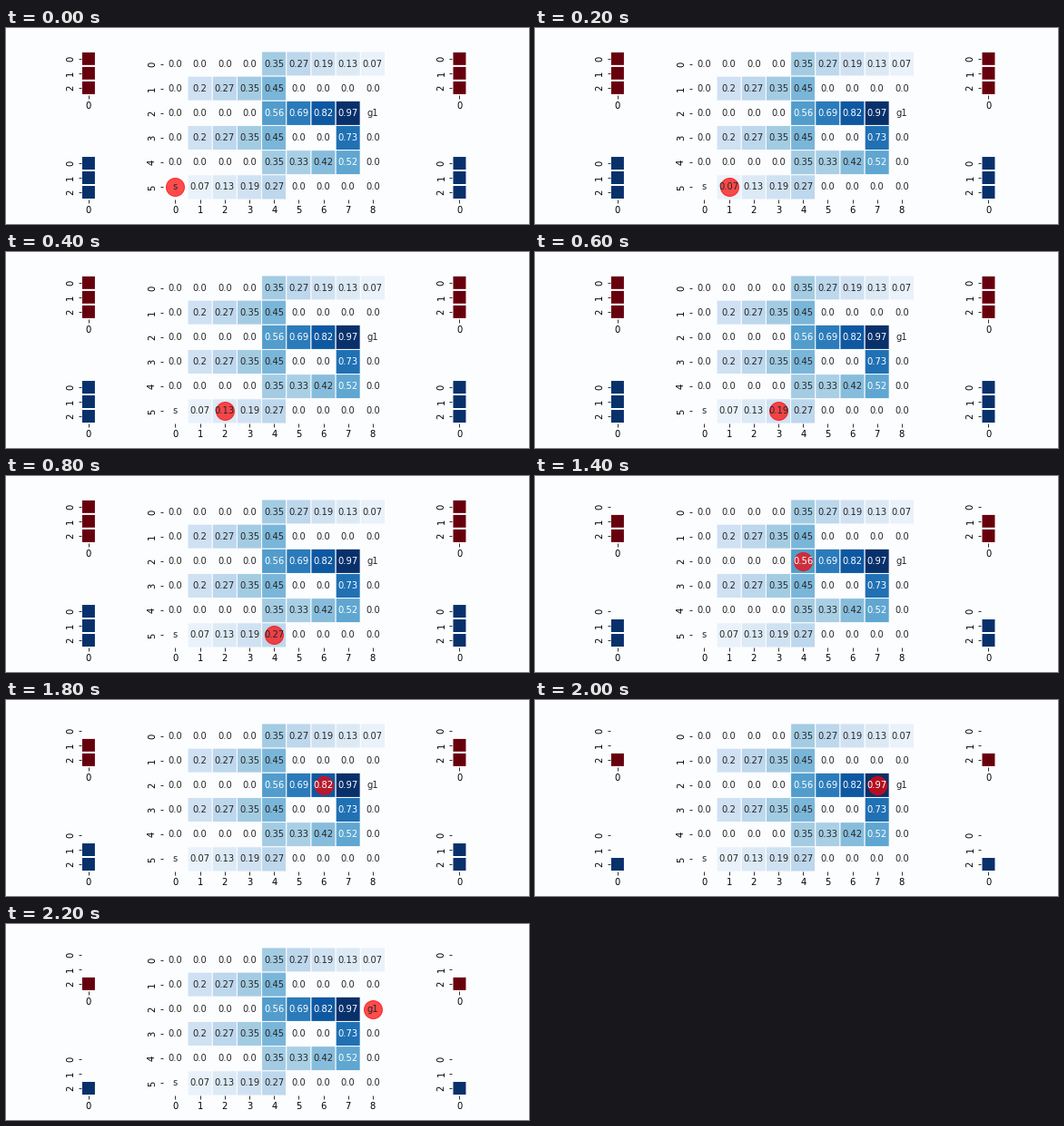
Write a matplotlib script that moves like this. It is 576 px wide and 216 px high and loops after 2.4 s.

```python
import matplotlib.pyplot as plt
import numpy as np
from matplotlib.animation import FuncAnimation
from matplotlib.patches import Circle

W, H, DPI = 576, 216, 72
BG = "#fcfdff"
GRID = np.array([
    [0, 0, 0, 0, .35, .27, .19, .13, .07],
    [0, .2, .27, .35, .45, 0, 0, 0, 0],
    [0, 0, 0, 0, .56, .69, .82, .97, 0],
    [0, .2, .27, .35, .45, 0, 0, .73, 0],
    [0, 0, 0, 0, .35, .33, .42, .52, 0],
    [0, .07, .13, .19, .27, 0, 0, 0, 0],
])
LABELS = {(5, 0): "s", (2, 8): "g1"}
PATH = ([(5, c) for c in range(5)] + [(r, 4) for r in (4, 3, 2)]
        + [(2, c) for c in range(5, 9)])

plt.rcParams.update({"font.family": "DejaVu Sans", "font.size": 10})
fig = plt.figure(figsize=(W / DPI, H / DPI), dpi=DPI, facecolor=BG)


def heatmap(cx, top, cell, data, cmap, vmax, lw):
    """Square-celled heatmap placed in pixels; zero cells stay blank."""
    rows, cols = data.shape
    w, h = cols * cell, rows * cell
    ax = fig.add_axes([(cx - w / 2) / W, 1 - (top + h) / H, w / W, h / H],
                      facecolor=BG)
    mesh = ax.pcolormesh(np.ma.masked_equal(data, 0), cmap=cmap, vmin=0,
                         vmax=vmax, edgecolors=BG, linewidth=lw,
                         antialiased=True, snap=False)
    ax.set(xlim=(0, cols), ylim=(rows, 0))
    ax.spines[:].set_visible(False)
    ax.set_xticks(np.arange(cols) + .5, range(cols))
    ax.set_yticks(np.arange(rows) + .5, range(rows), rotation=90, va="center")
    return ax, mesh


# Subplot area and a 3 x 10 layout with 20% gaps
LEFT, RIGHT, TOP, BOTTOM = .125 * W, .9 * W, .12 * H, .875 * H
side_h = (BOTTOM - TOP) / 3.4
side_w = (RIGHT - LEFT) / 11.8
cell = (BOTTOM - TOP) / 6
mid = (LEFT + RIGHT) / 2

main, _ = heatmap(mid, TOP, cell, GRID, "Blues", GRID.max(), 1)
for (r, c), v in np.ndenumerate(GRID):
    main.text(c + .5, r + .5, LABELS.get((r, c), str(v)), ha="center",
              va="center", color="w" if v > .5 else ".15")

bars = [heatmap(cx, top, side_h / 3, np.ones((3, 1)), cmap, 1, 2)[1]
        for cx in (LEFT + side_w / 2, RIGHT - side_w / 2)
        for top, cmap in ((TOP, "Reds"), (BOTTOM - side_h, "Blues"))]

# The marker sits on whole-pixel centres
dot = main.add_patch(Circle((0, 0), 10, color="r", alpha=.7, lw=1, zorder=2,
                            transform=None, clip_on=False))


def update(i):
    r, c = PATH[i]
    x = mid + (c - 4) * cell
    y = TOP + (r + .5) * cell
    dot.center = np.floor(x + .5) + .5, H - np.floor(y + .5) - .5
    used = (i >= 5) + (i >= 10)
    left = np.ma.masked_array(np.ones((3, 1)), np.arange(3)[:, None] < used)
    for bar in bars:
        bar.set_array(left)
    return [dot, *bars]


anim = FuncAnimation(fig, update, frames=len(PATH), interval=200,
                     repeat=True, repeat_delay=0)
plt.show()
```
